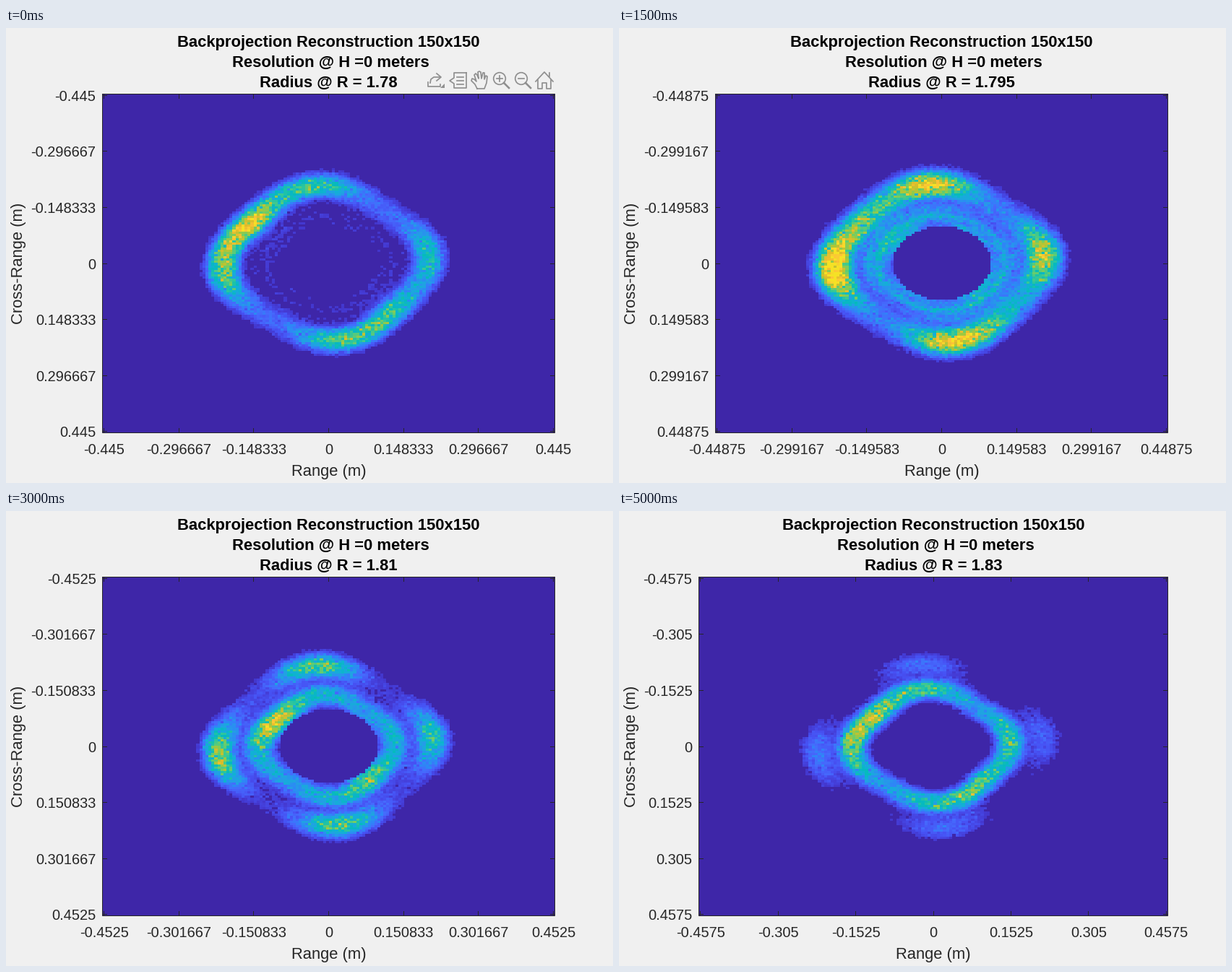
Write a matplotlib script that moves like this. It is 840 by 630 pixels and loops after 5500 ms.

```python
import numpy as np
import matplotlib.pyplot as plt
from matplotlib.animation import FuncAnimation
from matplotlib.colors import LinearSegmentedColormap
from matplotlib.patches import Circle, Polygon

W, H, DPI = 840, 630, 100
N, FRAMES = 150, 11
PX = 72 / DPI
RIGHT, TOP, BOTTOM = 759.5, 91.5, 560.5
INK, ICON, BACK = "#262626", "#8f8f8f", "#f0f0f0"

plt.rcParams["font.family"] = "Liberation Sans"

PARULA = LinearSegmentedColormap.from_list("parula", [
    "#3e26a8", "#4439d1", "#4752f4", "#456bfd", "#2e87f7", "#249ee6", "#12b1d6",
    "#05bbbc", "#37c897", "#70cd67", "#abc739", "#ddbd2b", "#fec338", "#f5e027",
    "#f9fb15"], N=256)

v, u = np.mgrid[:N, :N] - (N - 1) / 2
RADIUS, THETA = np.hypot(u, v), np.arctan2(v, u)

# A rounded diamond, turned a little, with its left corner drawn out.
TILT = np.radians(-6)
CORNER = np.cos(4 * (THETA - TILT))
CURVE = 32.4 + 1.9 * CORNER - np.cos(THETA)


def bell(x, width):
    return np.exp(-(x / width) ** 2 / 2)


def arc(degrees, spread):
    """Angular weight around one direction, clockwise from the right."""
    gap = np.angle(np.exp(1j * (THETA - np.radians(degrees))))
    return bell(gap, np.radians(spread))


def band(scale, width):
    return np.exp(-np.abs((RADIUS - scale * CURVE) / width) ** 2.5)


LOBES = sum(arc(a, 16) for a in (-6, 84, 174, 264)) * (0.6 - 0.08 * np.cos(THETA))
OUTER_STREAKS = 0.62 * arc(213, 20) + 0.36 * arc(50, 20)
INNER_STREAKS = 0.52 * arc(212, 21) + 0.34 * arc(47, 18)


def outer_ring(k):
    """The ring brightens, then breaks up into four lobes."""
    amp = (0.27 * bell(k - 2, 2.4) + OUTER_STREAKS * bell(k - 0.6, 2.4)
           + LOBES * bell(k - 4.2, 4))
    return amp * band(1 + 0.006 * k, 4.8 + 1.3 * bell(k - 3, 2))


def inner_ring(k):
    """The ring rises out of the hole and slowly widens."""
    rise = 1 - np.exp(-((k + 0.8) / 2) ** 2)
    ripple = 1 + 0.2 * np.cos(1.5 * RADIUS) * bell(k, 3)
    amp = (0.35 * rise * ripple + INNER_STREAKS * bell(k - 7.7, 3)
           + 0.1 * (1 + CORNER) * bell(k - 10, 3))
    return amp * band(0.61 + 0.13 * (k / 10) ** 2, 5.6 - 0.1 * k)


def field(k):
    rng = np.random.default_rng(40 + k)
    power = outer_ring(k) + inner_ring(k)
    power *= 1 + 0.11 * rng.normal(size=(N, N)) + 0.03 * rng.normal(size=(N, 1))
    power += 0.06 * np.sqrt(np.abs(power)) * rng.normal(size=(N, N))
    power[(power < 0.065) | (RADIUS < 16.3)] = 0
    return np.clip(power, 0, 0.93)


fig = plt.figure(figsize=(W / DPI, H / DPI), dpi=DPI, facecolor=BACK)
ax = fig.add_axes([0, 0, 1, 1])


def label(x, y, text, px=20, ha="center", color=INK, **kw):
    ax.text(x, y, text, fontsize=px * PX, ha=ha, va="baseline", color=color, **kw)


def line(pts, width=1, color=INK, **kw):
    ax.plot(*zip(*pts), lw=width * PX, color=color, snap=False, **kw)


def icon(*strokes):
    for pts in strokes:
        line(pts, 1.7, ICON, solid_joinstyle="round")


def magnifier(x, plus):
    ax.add_patch(Circle((x, 70), 8.3, fill=False, ec=ICON, lw=1.7 * PX))
    icon([(x - 4, 70), (x + 4, 70)])
    if plus:
        icon([(x, 66), (x, 74)])
    line([(x + 6, 76), (x + 13, 83)], 2.6, ICON)


def toolbar():
    icon([(584, 75), (584, 81), (601, 81), (601, 78)],
         [(587, 76), (588, 71), (592, 68), (600, 68)],
         [(596, 63), (602, 68), (596, 73)])
    ax.add_patch(Polygon([(607, 77), (607, 83), (601, 83)], color=ICON, lw=0))
    icon([(637, 62), (620, 62), (620, 69), (614, 73), (620, 77), (620, 83),
          (637, 83), (637, 62)],
         *[[(624, y), (633, y)] for y in (68, 73, 78)])
    icon([(652, 84), (649, 78), (644, 73), (645, 70), (648, 71), (651, 74),
          (648, 65), (650, 63), (652, 65), (654, 70), (653, 61), (655, 60),
          (657, 61), (658, 70), (660, 62), (662, 62), (662, 71), (664, 66),
          (666, 67), (665, 76), (662, 84), (652, 84)])
    magnifier(683, True)
    magnifier(713, False)
    icon([(733, 74), (745, 61), (757, 74)],
         [(736, 72), (736, 84), (742, 84), (742, 76), (748, 76), (748, 84),
          (754, 84), (754, 72)],
         [(752, 67), (752, 62)])


def text_width(s):
    return 20 * sum({"-": .333, ".": .278}.get(c, .556) for c in s)


def draw(k):
    ax.clear()
    ax.axis("off")
    radius = 1.78 + 0.005 * k
    half = radius / 4
    names = [f"{half * i / 3:.6g}" if i else "0" for i in range(-3, 4)]
    widest = max(map(text_width, names))
    left = max(110, int(43 + widest)) + 0.5
    cx, cy = (left + RIGHT) / 2, (TOP + BOTTOM) / 2

    ax.imshow(field(k), cmap=PARULA, vmin=0, vmax=1, aspect="auto",
              interpolation="nearest", extent=(left, RIGHT, BOTTOM, TOP))
    ax.set_xlim(0, W)
    ax.set_ylim(H, 0)
    line([(left, TOP), (RIGHT, TOP), (RIGHT, BOTTOM), (left, BOTTOM), (left, TOP)],
         solid_joinstyle="miter")

    inset = (N - 1) / N / 3
    for i, name in zip(range(-3, 4), names):
        x = cx + i * inset * (RIGHT - left) / 2
        y = cy + i * inset * (BOTTOM - TOP) / 2
        tx, ty = int(x) + 0.5, int(y) + 0.5
        for edge, step in ((TOP, 6), (BOTTOM, -6)):
            line([(tx, edge), (tx, edge + step)])
        for edge, step in ((left, 6), (RIGHT, -6)):
            line([(edge, ty), (edge + step, ty)])
        label(x, 590, name)
        label(left - 9, y + 7.5, name, ha="right")

    label(cx, 620, "Range (m)", 22)
    label(round(left - widest - 20), cy - 0.5, "Cross-Range (m)", 22, rotation=90,
          rotation_mode="anchor")
    title = (("Backprojection Reconstruction 150x150", 0),
             ("Resolution @ H =0 meters", 3), (f"Radius @ R = {radius:.6g}", 0))
    for i, (row, shift) in enumerate(title):
        label(cx + shift, 26 + 28 * i, row, 22, weight="bold", color="black")
    if k == 0:
        toolbar()
    return []


anim = FuncAnimation(fig, draw, frames=FRAMES, interval=500, repeat=True,
                     repeat_delay=0, blit=False)
plt.show()
```
